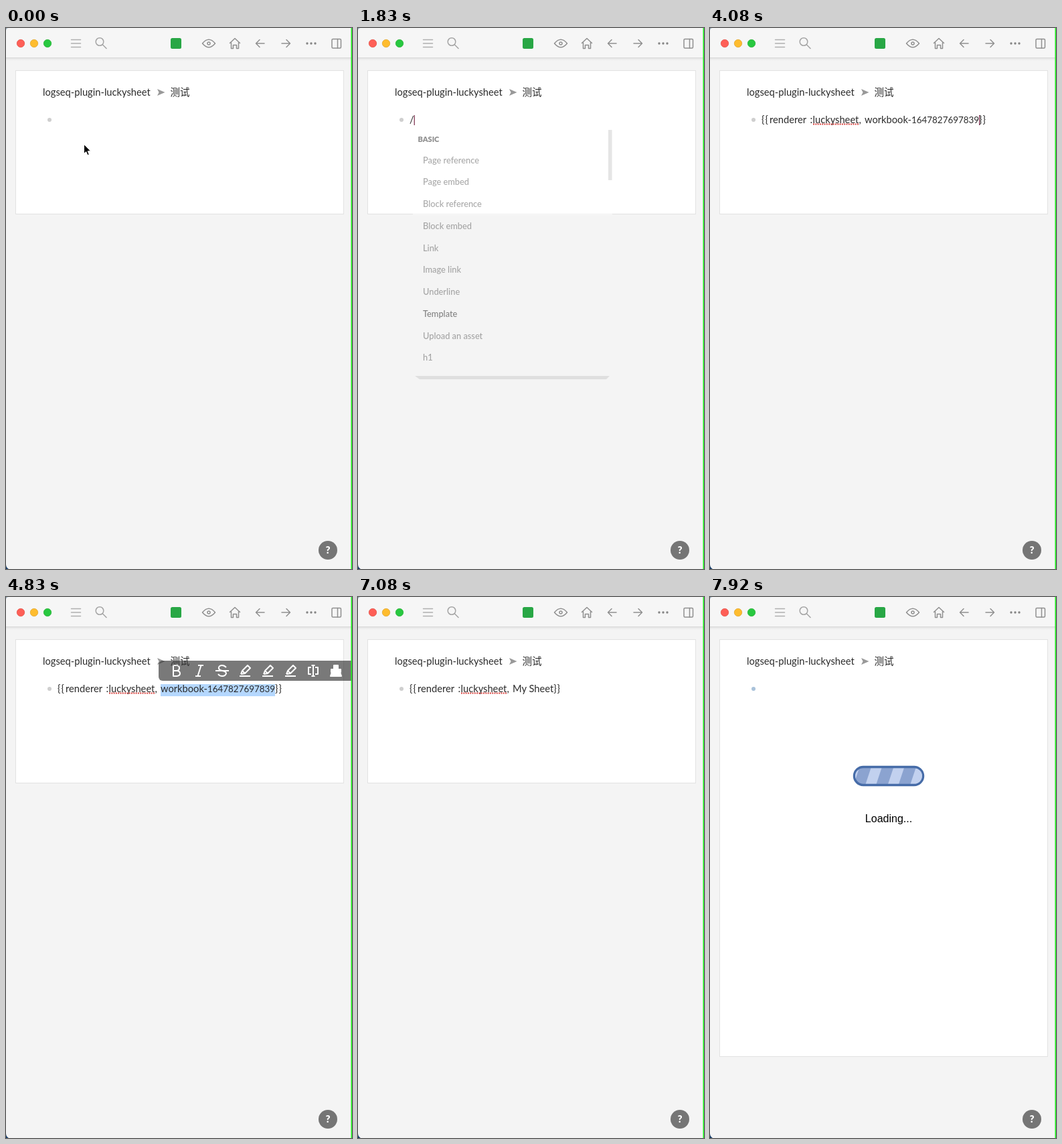
An HTML page for the animation above (8000 ms loop, 517 px wide and 807 px high).

```html
<!DOCTYPE html>
<html lang="en">
<head>
<meta charset="utf-8">
<title>Inserting a sheet block</title>
<style>
  html, body { margin: 0; width: 100%; height: 100%; overflow: hidden; background: #f4f4f4; }
  svg { display: block; width: 517px; height: 807px; }
  text { font-family: Lato, "Noto Sans CJK SC", "Noto Sans CJK", sans-serif; font-size: 14.7px; fill: #2b2b2b; white-space: pre; }
  .icon { fill: none; stroke: #909090; stroke-width: 1.5; stroke-linecap: round; stroke-linejoin: round; }
  .tool { fill: none; stroke: #fff; stroke-width: 2; stroke-linejoin: round; }
  .action { fill: none; stroke: #000; stroke-width: 1.4; stroke-linecap: round; stroke-linejoin: round; }
  .menu text { font-size: 12.8px; font-weight: 500; fill: #555; }
  .menu .heading { font-size: 11px; font-weight: 900; fill: #222; }
  #menu .hover { fill: #111; }
</style>
</head>
<body>
<svg viewBox="0 0 517 807">
  <defs>
    <linearGradient id="shade" x2="0" y2="1">
      <stop stop-color="#000" stop-opacity=".06"/><stop offset="1" stop-color="#000" stop-opacity="0"/>
    </linearGradient>
    <clipPath id="barClip"><rect x="217" y="255.500" width="100" height="23" rx="11.500"/></clipPath>
    <g id="marker">
      <path d="M-6 5L-4 0L4 -8L8 -4L0 4L-6 5M-4 0L0 4M-8 8H8"/>
    </g>
  </defs>

  <rect width="517" height="807" fill="#f4f4f4"/>
  <rect width="517" height="44" fill="#f6f6f6"/>
  <path d="M0 44.500H516" stroke="#d8d8d8"/>
  <rect y="45" width="516" height="4" fill="url(#shade)"/>
  <path d="M0 0H4Q0 0 0 4Z" fill="#8fa5b8"/>
  <path d="M0 807H4Q0 805 0 800Z" fill="#153a66"/>

  <g stroke-width=".7">
    <circle cx="22" cy="23" r="5.700" fill="#fe5f57" stroke="#e0483e"/>
    <circle cx="42" cy="23" r="5.700" fill="#febc2e" stroke="#dfa023"/>
    <circle cx="62" cy="23" r="5.700" fill="#28c840" stroke="#1dad2b"/>
  </g>
  <g class="icon">
    <path d="M97.500 17.500H111.500M97.500 23H111.500M97.500 28.500H111.500" stroke="#b0b0b0"/>
    <g stroke="#a5a5a5"><circle cx="140" cy="20.500" r="5.800"/><path d="M144.500 25L150 30.500"/></g>
    <path d="M293.500 23Q303 11.500 312.500 23Q303 34.500 293.500 23Z"/><circle cx="303" cy="23" r="2"/>
    <path d="M334.500 22.500L342 15.500L349.500 22.500M336.500 21.500V30.500H339.500V25.500H344.500V30.500H347.500V21.500"/>
    <path d="M386 23H374M379 17.500L373.500 23L379 28.500M412 23H424M419 17.500L424.500 23L419 28.500"/>
    <rect x="487" y="16.500" width="13.500" height="13.500" rx="1.500"/><path d="M495.500 16.500V30"/>
  </g>
  <rect x="246" y="15" width="16" height="16" rx="2.500" fill="#28a745"/>
  <g fill="#858585"><circle cx="450" cy="23" r="1.700"/><circle cx="456" cy="23" r="1.700"/><circle cx="462" cy="23" r="1.700"/></g>

  <rect id="card" x="14.500" y="63.500" width="490" height="214" fill="#fff" stroke="#e2e2e2"/>
  <text x="55" y="101">logseq-plugin-luckysheet</text>
  <path d="M226 91L237.500 96L226 101L228.500 96Z" fill="#999"/>
  <text x="245.500" y="101" style="font-size:14.500px">测试</text>

  <g id="sheet">
    <g id="flash">
      <rect x="35" y="123" width="429" height="437" fill="#bfe5ff"/>
      <rect x="77" y="142" width="380" height="400" fill="#f4f4f4"/>
      <rect x="78" y="142" width="377.500" height="141" fill="#fff"/>
      <g class="action">
        <path d="M349.500 169.500Q346.500 169.500 346.500 166.500V157.500Q346.500 154.500 349.500 154.500H358.500Q361.500 154.500 361.500 157.500V161M355 170V164M353 166L355 164L357 166M360 170V164M358 166L360 164L362 166"/>
        <path d="M384 160L388 156M384.500 156H388V159.500M380 164L376 168M376 164.500V168H379.500"/>
        <path d="M403 169L404 164.500L413 155.500Q415 154.500 416.500 156Q418 157.500 416.500 159.500L407.500 168.500ZM411 157.500L414.500 161"/>
        <path d="M432.500 158H443.500M436 158V155.500H440V158M433.500 158V169.500H442.500V158M436.500 161V166.500M439.500 161V166.500"/>
      </g>
    </g>
    <g id="loader">
      <rect x="215.500" y="253.500" width="103" height="27" rx="13.500" fill="#8ba3d0" stroke="#466ca8" stroke-width="3.500"/>
      <g clip-path="url(#barClip)"><path id="stripes" fill="#c2d1ef"/></g>
      <text x="267" y="336" text-anchor="middle" style="font:16px 'Liberation Sans',Arial,sans-serif;fill:#000">Loading...</text>
    </g>
  </g>
  <circle id="bullet" cx="65" cy="137" r="3"/>

  <text id="command" x="77" y="142"></text>
  <g id="renderer">
    <rect id="selection" x="231" y="130" height="18" fill="#b4d7fe"/>
    <text y="142"><tspan x="77" letter-spacing="1">{{</tspan><tspan x="89">renderer</tspan><tspan x="149.500">:</tspan><tspan x="153.500">luckysheet</tspan><tspan x="222.500">,</tspan></text>
    <text id="value" x="231" y="142"><tspan id="words"></tspan><tspan id="digits" font-size="13.400"></tspan></text>
    <text id="closing" y="142" letter-spacing="1">}}</text>
    <path id="spelling" d="M154 143.500H222" stroke="#d8433f" stroke-width="2" stroke-dasharray="2 1.300"/>
  </g>
  <rect id="caret" y="130" width="1.200" height="15" fill="#7a2a4a"/>

  <g id="menu" class="menu">
    <rect x="82" y="152" width="298" height="127" fill="#fff"/>
    <g id="menuBase">
      <rect x="82.500" y="152" width="298" height="372" rx="5" fill="#fff" stroke="#ddd"/>
      <rect x="83" y="412" width="291" height="32" fill="#e9eef1"/>
    </g>
    <rect x="374" y="152" width="5.500" height="75" fill="#ccc"/>
    <path d="M85 519H376L371 524H92Z" fill="#ccc"/>
    <text class="heading" x="89.500" y="170">BASIC</text>
  </g>
  <g id="filtered" class="menu">
    <rect x="78" y="152" width="302" height="77" rx="6" fill="#fff" stroke="#ddd"/>
    <rect x="79" y="184" width="300" height="32" fill="#e9eef1"/>
    <text class="heading" x="89.500" y="170">PLUGINS</text>
    <text x="97" y="204">Luckysheet</text>
  </g>

  <g id="toolbar">
    <rect x="228" y="95" width="300" height="30" rx="6" fill="#333"/>
    <g class="tool">
      <path d="M250 102H255Q259 102.500 259 106T255 110H250M255 110Q260 110.500 260 114T255 118H250V102"/>
      <path d="M287 102H295M283 118H291M291.500 102L286.500 118"/>
      <path d="M329 105Q326 101.500 322 102Q317 103 318 107Q319 109 323 110Q329 111 329 114Q328 118 323 118Q319 118 317 115M313 110H333"/>
      <use href="#marker" x="357" y="110"/><use href="#marker" x="391" y="110"/><use href="#marker" x="425" y="110"/>
      <path d="M456 105H452V115H456M462 105H466V115H462M459 102V118M456.500 102H461.500M456.500 118H461.500"/>
      <path d="M490 102H496V108H500V112H486V108H490ZM487 112L485 118H501L499 112" fill="#fff"/>
    </g>
  </g>

  <g id="pointer">
    <path id="arrow" d="M0 0V14L3.200 11L5.400 16.200L7.800 15.200L5.600 10.200H10Z" fill="#000" stroke="#fff"/>
    <path id="beam" d="M-3 -8Q0 -8 0 -6Q0 -8 3 -8M0 -6V6M-3 8Q0 8 0 6Q0 8 3 8" fill="none" stroke="#222" stroke-width="1.200"/>
  </g>

  <circle cx="481" cy="779" r="14" fill="#757575"/>
  <text x="481" y="784" text-anchor="middle" style="font-weight:900;font-size:15px;fill:#fff">?</text>
  <path d="M516.300 0V807" stroke="#1cf21c" stroke-width="1.600"/>
</svg>
<script>
const LOOP = 8000, TICK = 1000 / 12;
const $ = id => document.getElementById(id);
const set = (id, attrs) => { for (const k in attrs) $(id).setAttribute(k, attrs[k]); };
const fade = (id, opacity) => set(id, { opacity: +opacity });
const write = (id, text) => { if ($(id).textContent !== text) $(id).textContent = text; };
const mix = (a, b, p) => a + (b - a) * p;
const ease = (t, from, to) => {
  const p = Math.min(1, Math.max(0, (t - from) / (to - from)));
  return p * p * (3 - 2 * p);
};
// Value of the latest step whose time has come.
const step = (t, steps) => steps.reduce((value, [time, next]) => t >= time ? next : value, steps[0][1]);

const commands = [[0, ""], [1750, "/"], [2170, "/l"], [2250, "/lu"], [2420, "/luc"], [2830, "/luck"], [2920, "/lucky"]];
const values = [[0, "workbook-"], [5580, "M"], [5830, "My"], [6000, "My "], [6250, "My S"], [6330, "My Sh"],
  [6420, "My She"], [6500, "My Shee"], [6670, "My Sheet"]];
const carets = [[0, 0], [500, 1], [1080, 0], [1420, 1], [3670, 0], [3920, 1], [4250, 0], [5580, 1], [7080, 0]];
const toolbarFade = [[0, 0], [4250, .25], [4670, .35], [4750, .5], [4830, .65], [4920, .8], [5000, .9], [5080, 1],
  [5580, .4], [5670, .055], [5750, 0]];
const flashFade = [[0, 1], [7580, .7], [7670, .4], [7750, .15], [7830, 0]];

["Page reference", "Page embed", "Block reference", "Block embed", "Link", "Image link", "Underline",
  "Template", "Upload an asset", "h1"].forEach((label, i) => {
  const item = document.createElementNS($("menu").namespaceURI, "text");
  item.textContent = label;
  item.setAttribute("x", 97);
  item.setAttribute("y", 201.500 + i * 32.750);
  if (label === "Template") item.setAttribute("class", "hover");
  $("menu").append(item);
});

function drawPointer(t) {
  const tick = Math.floor((t + 4) / TICK) * TICK;
  const toBlock = ease(tick, 0, 500), toMenu = ease(tick, 750, 1170);
  const x = mix(mix(116.500, 104, toBlock), 270, toMenu);
  const y = mix(mix(173.500, 139, toBlock), 428, toMenu);
  const overText = y < 155;
  set("pointer", { transform: `translate(${x} ${y})`, opacity: +(t < 1420) });
  fade("arrow", !overText);
  fade("beam", overText);
}

function drawEditor(t) {
  const inserted = t >= 3250, rendered = t >= 7420;
  write("command", inserted ? "" : step(t, commands));
  write("words", step(t, values));
  write("digits", t < 5580 ? "1647827697839" : "");
  const valueEnd = 231 + $("value").getComputedTextLength();
  set("closing", { x: valueEnd });
  set("selection", { width: valueEnd - 231, opacity: +(t >= 4250 && t < 5580) });
  fade("renderer", inserted && !rendered);
  fade("spelling", t >= 3420);
  const closingOffset = step(t, [[0, 12], [3920, 6], [4000, 0]]);
  const caretX = inserted ? valueEnd + closingOffset : 77 + $("command").getComputedTextLength();
  set("caret", { x: caretX, opacity: step(t, carets) });
}

function drawMenus(t) {
  fade("menu", step(t, [[0, 0], [1750, .25], [1830, .5], [1920, .8], [2000, 1], [2250, 0]]));
  fade("menuBase", step(t, [[0, 0], [1920, .6], [2000, 1]]));
  fade("filtered", t >= 2250 && t < 3250);
  fade("toolbar", step(t, toolbarFade));
}

function drawSheet(t) {
  const rendered = t >= 7420;
  fade("sheet", rendered);
  fade("flash", step(t, flashFade));
  fade("loader", t >= 7750);
  set("card", { height: rendered ? 622 : 214 });
  set("bullet", { fill: t >= 7580 ? "#a9c2da" : rendered ? "#b0b8be" : "#cfcfcf" });
  const shift = (Math.min(t, 7920) - 7920) * .034;
  let d = "";
  for (let i = -1; i < 5; i++) d += `M${199 + i * 33.500 + shift} 279l8 -24h16l-8 24z`;
  set("stripes", { d });
}

const start = performance.now();
function frame() {
  const t = (performance.now() - start) % LOOP;
  drawPointer(t);
  drawEditor(t);
  drawMenus(t);
  drawSheet(t);
  requestAnimationFrame(frame);
}
frame();
</script>
</body>
</html>
```
